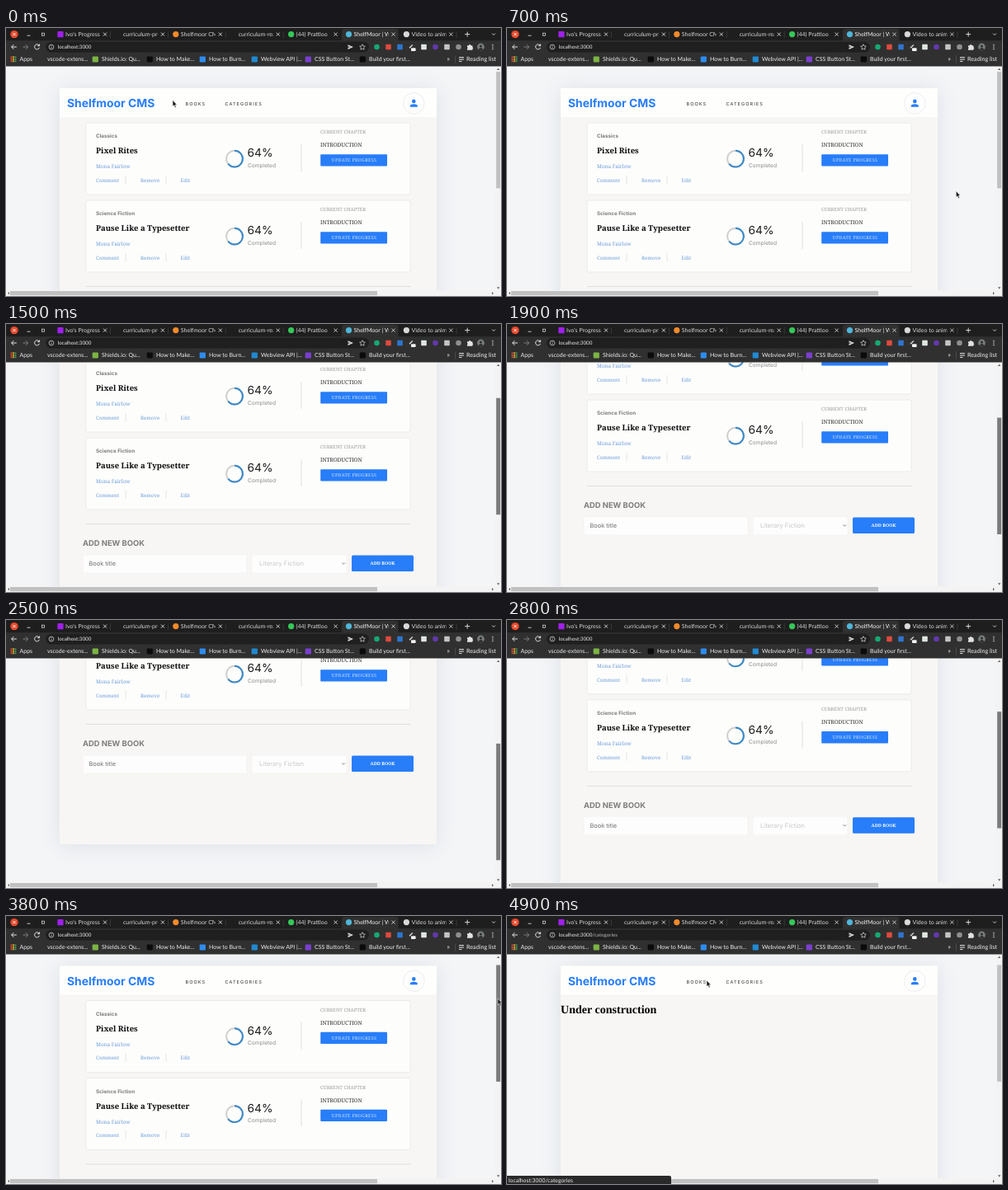
An HTML page that plays this animation: 600 by 325 pixels, repeating every 5 s.

```html
<!DOCTYPE html>
<html lang="en">
<head>
<meta charset="utf-8">
<title>Book list demo</title>
<style>
  html, body { margin: 0; width: 100%; height: 100%; overflow: hidden; background: #f2f3f5; }
  svg { display: block; width: 100%; height: 100%; }
  text { white-space: pre; text-rendering: geometricPrecision; }
  .ui { font-family: Lato, sans-serif; }
  .sans { font-family: Inter, sans-serif; }
  .slab { font-family: "Noto Serif", serif; }
  .times { font-family: "Liberation Serif", serif; }
</style>
</head>
<body>
<svg id="stage" viewBox="0 0 600 325" xmlns="http://www.w3.org/2000/svg"></svg>
<script>
const LOOP = 5000, STEP = 100;
const BLUE = '#287df8', LINK = '#6b9cda';

const rect = (x, y, w, h, fill, more = '') =>
  `<rect x="${x}" y="${y}" width="${w}" height="${h}" fill="${fill}" ${more}/>`;
const dot = (x, y, r, fill, more = '') =>
  `<circle cx="${x}" cy="${y}" r="${r}" fill="${fill}" ${more}/>`;
const line = (d, color, w = 1, more = '') =>
  `<path d="${d}" fill="none" stroke="${color}" stroke-width="${w}" ${more}/>`;
const text = (font, x, y, size, fill, str, more = '') =>
  `<text class="${font}" x="${x}" y="${y}" font-size="${size}" fill="${fill}" ${more}>${str}</text>`;
const bold = 'font-weight="700"', light = 'font-weight="300"', mid = 'text-anchor="middle"';

// ---------- web page ----------
function card(y, genre, title) {
  const around = 2 * Math.PI * 9.9;
  return `<g transform="translate(0 ${y})">` +
    rect(97, 0, 393, 87, '#fdfdfc', 'rx="2" stroke="#e8e7e6" stroke-width=".8"') +
    text('sans', 109, 18.2, 6.3, '#7a7a7a', genre, bold) +
    text('slab', 109, 37.4, 9.5, '#0c0c0c', title, bold) +
    text('slab', 109, 55.2, 6.3, LINK, 'Mona Fairlow', light) +
    text('slab', 109, 71.8, 6.1, LINK, 'Comment', light) +
    text('slab', 163, 71.8, 6.1, LINK, 'Remove', light) +
    text('slab', 211.5, 71.8, 6.1, LINK, 'Edit', light) +
    line('M145 64V74M194 64V74', '#dedede', .8) +
    dot(277, 43.6, 9.9, 'none', 'stroke="#d0d0d0" stroke-width="2"') +
    dot(277, 43.6, 9.9, 'none', `stroke="#3a88c6" stroke-width="2" stroke-dasharray="${around * .64} ${around}" transform="rotate(-90 277 43.6)"`) +
    text('sans', 292.5, 41, 13.8, '#1c1c1c', '64%') +
    text('sans', 293, 53.5, 6.6, '#8c8c8c', 'Completed') +
    line('M358 26V59', '#dcdcdc', .9) +
    text('slab', 381, 13.4, 5.8, '#9a9a9a', 'CURRENT CHAPTER', light) +
    text('slab', 381, 29.2, 6.6, '#2c2c2c', 'INTRODUCTION', light) +
    rect(381.2, 38.2, 80.8, 14.4, BLUE, 'rx="1"') +
    text('slab', 422, 47.4, 5.4, '#d3e5ff', 'UPDATE PROGRESS', `${light} ${mid} letter-spacing=".3"`) +
    '</g>';
}

const form =
  line('M97 313.5H491', '#dfdfde', 1) +
  text('sans', 93, 340.2, 9.4, '#7d7d7d', 'ADD NEW BOOK', bold) +
  rect(93, 351, 199, 22, '#fdfdfd', 'rx="1.5" stroke="#f1f0ef" stroke-width=".6"') +
  text('sans', 100.5, 364, 7.4, '#707070', 'Book title') +
  rect(298, 351, 115, 22, '#fdfdfd', 'rx="1.5" stroke="#f1f0ef" stroke-width=".6"') +
  text('sans', 307, 364, 7.7, '#c9c9c9', 'Literary Fiction') +
  line('M407.5 360.5l1.8 1.8l1.8-1.8', '#777', .9) +
  rect(419, 351.5, 75, 19.5, BLUE, 'rx="1.5"') +
  text('slab', 456.5, 363.3, 5.4, '#fff', 'ADD BOOK', `${bold} ${mid}`);

const header =
  rect(65, 73, 457, 35, '#fefefd') +
  text('sans', 74, 96.2, 13.9, BLUE, 'Shelfmoor CMS', bold) +
  text('sans', 217.5, 94.2, 5.6, '#333', 'BOOKS', 'letter-spacing="1.05"') +
  text('sans', 265.5, 94.2, 5.6, '#333', 'CATEGORIES', 'letter-spacing="1.05"') +
  dot(494.3, 91.3, 12.8, '#fefefe', 'stroke="#e6e6e6" stroke-width=".7"') +
  dot(494.3, 88.9, 2.3, BLUE) +
  `<path d="M489.8 95.8v-1.2c0-3.2 9-3.2 9 0v1.2z" fill="${BLUE}"/>`;

const page =
  rect(65, 75, 457, 386, '#5a7390', 'opacity=".16" filter="url(#soft)"') +
  rect(65, 73, 457, 386, '#f8f6f4') + header +
  `<g id="books">${card(115, 'Classics', 'Pixel Rites')}${card(209, 'Science Fiction', 'Pause Like a Typesetter')}${form}</g>` +
  `<g id="empty">${text('times', 65, 130.2, 14.05, '#000', 'Under construction', bold)}</g>`;

// ---------- browser ----------
const tabs = [
  ["Ivo's Progress", '#a020f0', 'square'], ['curriculum-pro'], ['Shelfmoor CMS', '#f38a2c', 'dot'],
  ['curriculum-rea'], ['(44) Prattloo', '#35c759', 'dot'], ['ShelfMoor | We', '#4fb6d8', 'dot'],
  ['Video to anima', '#d8d8d8', 'dot']
];
const marks = [
  [50, 'vscode-extens...'], [116, 'Shields.io: Qu...', '#7cb342'], [182, 'How to Make...', '#0b0b0b'],
  [246, 'How to Burn...', '#2d8cf0'], [309, 'Webview API |...', '#1f8ad2'],
  [374, 'CSS Button St...', '#7a3fd0'], [440, 'Build your first...', '#0a0a0a']
];
const icons = [
  [449.5, '#15a972', 'dot'], [463.5, '#dc4a3d', 'square'], [477.5, '#2f74d0', 'square'], [506.5, '#dfe7df', 'square'],
  [520.5, '#6238b0', 'dot'], [534.5, '#c4c4c4', 'square'], [548.5, '#8f8f8f', 'dot']
];
const badge = (kind, x, y, r, fill) => kind === 'dot'
  ? dot(x, y, r, fill) : rect(x - r, y - r, 2 * r, 2 * r, fill, 'rx=".8"');

function tab([label, color, kind], i) {
  const x = 60 + 69.9 * i, active = i === 5;
  return (active ? `<path d="M${x - 2.5} 15.5V4q0-3 3-3H${x + 63}q3 0 3 3V15.5z" fill="#303030"/>` : '') +
    (color ? badge(kind, x + 6, 7.6, 3.6, color) : '') +
    `<g clip-path="url(#tabclip)" transform="translate(${x + 12} 0)">${text('ui', 0, 10, 7, active ? '#f2f2f2' : '#d8d8d8', label)}</g>` +
    line(`M${x + 58} 5.6l4 4m0-4l-4 4`, '#e4e4e4', .9) +
    (active || i === 4 ? '' : line(`M${x + 66.5} 4V12`, '#4a4a4a', .6));
}

function appsGrid() {
  const colors = ['#e8513f', '#f2b52c', '#43a85a', '#4a86e8'];
  let out = '';
  for (let i = 0; i < 9; i++)
    out += rect(5.6 + (i % 3) * 2.5, 34.4 + Math.floor(i / 3) * 2.5, 1.8, 1.8, colors[(i + Math.floor(i / 3)) % 4]);
  return out;
}

const chrome =
  rect(0, 0, 600, 46.5, '#303030') + rect(0, 0, 600, 15.2, '#1e1e1e') +
  dot(10, 7.6, 4.7, '#e8492c') + line('M8.3 5.9l3.4 3.4m0-3.4l-3.4 3.4', '#fff', .9) +
  line('M25.5 9.2h4', '#d5d5d5', .9) + rect(43.4, 6.2, 3, 3, 'none', 'stroke="#d5d5d5" stroke-width=".8"') +
  tabs.map(tab).join('') +
  line('M556.2 7.6h6m-3-3v6', '#e6e6e6', .9) +
  line('M589.2 6.6l1.9 1.9l1.9-1.9', '#e0e0e0', .9) +
  // toolbar
  line('M12.8 23H6.6m2.8-2.8L6.6 23l2.8 2.8', '#e6e6e6', 1) +
  line('M20.5 23h6.2m-2.8-2.8l2.8 2.8l-2.8 2.8', '#7c7c7c', 1) +
  line('M40 21a3 3 0 1 0 .5 2.8M40.6 19.5v2.2h-2.2', '#e6e6e6', 1) +
  rect(48, 16.8, 392, 12.6, '#1f1f1f', 'rx="6.3"') +
  dot(55, 23, 2.9, 'none', 'stroke="#cfcfcf" stroke-width=".8"') + line('M55 22.6v2M55 21v.8', '#cfcfcf', .8) +
  '<text class="ui" x="62.7" y="25.3" font-size="6.25" fill="#ececec">localhost:3000<tspan id="path" fill="#b4b4b4"></tspan></text>' +
  '<path d="M414.5 20.3l6.5 2.8l-6.5 2.8v-2.2l3.6-.6l-3.6-.6z" fill="#dcdcdc"/>' +
  '<path d="M432 19.7l1 2.2l2.4.3l-1.8 1.6l.5 2.4l-2.1-1.2l-2.1 1.2l.5-2.4l-1.8-1.6l2.4-.3z" fill="none" stroke="#dcdcdc" stroke-width=".7"/>' +
  icons.map(([x, c, kind]) => badge(kind, x, 23, 3.3, c)).join('') +
  line('M489 24.2l3.8-3.8', '#d8d8d8', 1.4) + rect(491, 24.2, 5.6, 3.8, '#f2f2f2', 'rx=".8"') +
  '<path d="M559 21.2h2a1.2 1.2 0 0 1 2.4 0h2v2a1.2 1.2 0 0 1 0 2.3v1.3h-6.4v-1.7a1.1 1.1 0 0 0 0-2z" fill="#e2e2e2"/>' +
  dot(575.5, 23, 4.4, '#777d7c') + dot(575.5, 22, 1.5, '#2d302f') + '<path d="M572.5 26.2q3-4.4 6 0q-3 2-6 0" fill="#2d302f"/>' +
  [20.4, 23, 25.6].map(y => dot(590, y, .75, '#e6e6e6')).join('') +
  // bookmarks
  appsGrid() + text('ui', 16.5, 40.4, 7, '#ededed', 'Apps') +
  marks.map(([x, label, c]) =>
    (c ? rect(x - 11.3, 34.4, 7.2, 7.2, c, 'rx="1"') : '') + text('ui', x, 40.4, 7, '#ededed', label)).join('') +
  text('ui', 534.5, 40.2, 8, '#ededed', '»') + line('M544.5 33.5V42.5', '#555', .7) +
  line('M549 35.6h6M549 38h6M549 40.4h3.6', '#e2e2e2', 1) +
  text('ui', 558, 40.4, 7.2, '#ededed', 'Reading list');

const bars =
  rect(593, 46, 7, 279, '#f3f3f3') + rect(0, 318, 600, 7, '#f3f3f3') +
  '<path d="M595 51l1.7-2.2l1.7 2.2zM595 314.3h3.4l-1.7 2.2zM4 320l-2 1.6l2 1.6zM589 320v3.4l2-1.7z" fill="#606060"/>' +
  rect(5, 319, 445, 5.2, '#c0c0c0') +
  rect(594.2, 53, 5, 141.4, '#c0c0c0', 'id="thumb"');

const status = '<g id="status">' +
  '<path d="M0 315H197q2 0 2 2V325H0z" fill="#2a2a2a"/>' +
  text('ui', 2, 322.6, 6.85, '#f0f0f0', 'localhost:3000/categories') + '</g>';

const pointer = '<path id="pointer" d="M0 0V7.6L1.7 6.1L2.9 8.9L4.2 8.3L3 5.6H5.2Z" fill="#1c1c1c" stroke="#fff" stroke-width=".5"/>';

document.getElementById('stage').innerHTML =
  '<defs><filter id="soft" x="-20%" y="-20%" width="140%" height="140%"><feGaussianBlur stdDeviation="13"/></filter>' +
  '<clipPath id="tabclip"><rect width="42" height="15"/></clipPath></defs>' +
  rect(0, 0, 600, 325, '#f4f5f7') + `<g id="page">${page}</g>` + bars + status + chrome + pointer;

// ---------- motion ----------
const scrollKeys = [[0, 0], [950, 0], [1100, 25], [1900, 117], [2400, 187], [2600, 187], [3100, 0], [3300, 0], [3700, 12.5]];
const pointerKeys = [
  [0, 202, 87.5], [600, 518, 248], [900, 597, 97], [1000, 598, 100], [1100, 598, 109], [1900, 602, 157],
  [2400, 603, 194], [2600, 603, 194], [3100, 596, 95.5], [3400, 596, 95.5], [3700, 596, 100], [3900, 596, 100],
  [4300, 292, 77], [4600, 286, 77], [4900, 242, 78]
];

function at(keys, t) {
  const i = keys.findIndex(k => k[0] > t);
  if (i < 0) return keys[keys.length - 1].slice(1);
  const [a, b] = [keys[i - 1], keys[i]], p = (t - a[0]) / (b[0] - a[0]);
  return a.slice(1).map((v, j) => v + (b[j + 1] - v) * p);
}

const $ = id => document.getElementById(id);
const show = (id, on) => $(id).setAttribute('visibility', on ? 'visible' : 'hidden');

function draw(t) {
  const [scroll] = at(scrollKeys, t), [x, y] = at(pointerKeys, t);
  const moved = t >= 4500;
  $('page').setAttribute('transform', `translate(0 ${-scroll})`);
  $('thumb').setAttribute('y', 53 + scroll * .518);
  $('thumb').setAttribute('fill', t >= 900 && t < 4000 ? '#7b7b7b' : '#c0c0c0');
  $('pointer').setAttribute('transform', `translate(${x} ${y})`);
  $('path').textContent = moved ? '/categories' : '';
  show('books', !moved);
  show('empty', moved);
  show('status', t >= 4300);
}

const start = performance.now();
function tick() {
  const t = (performance.now() - start) % LOOP;
  draw(Math.floor(t / STEP) * STEP);
  requestAnimationFrame(tick);
}
draw(0);
requestAnimationFrame(tick);
</script>
</body>
</html>
```
